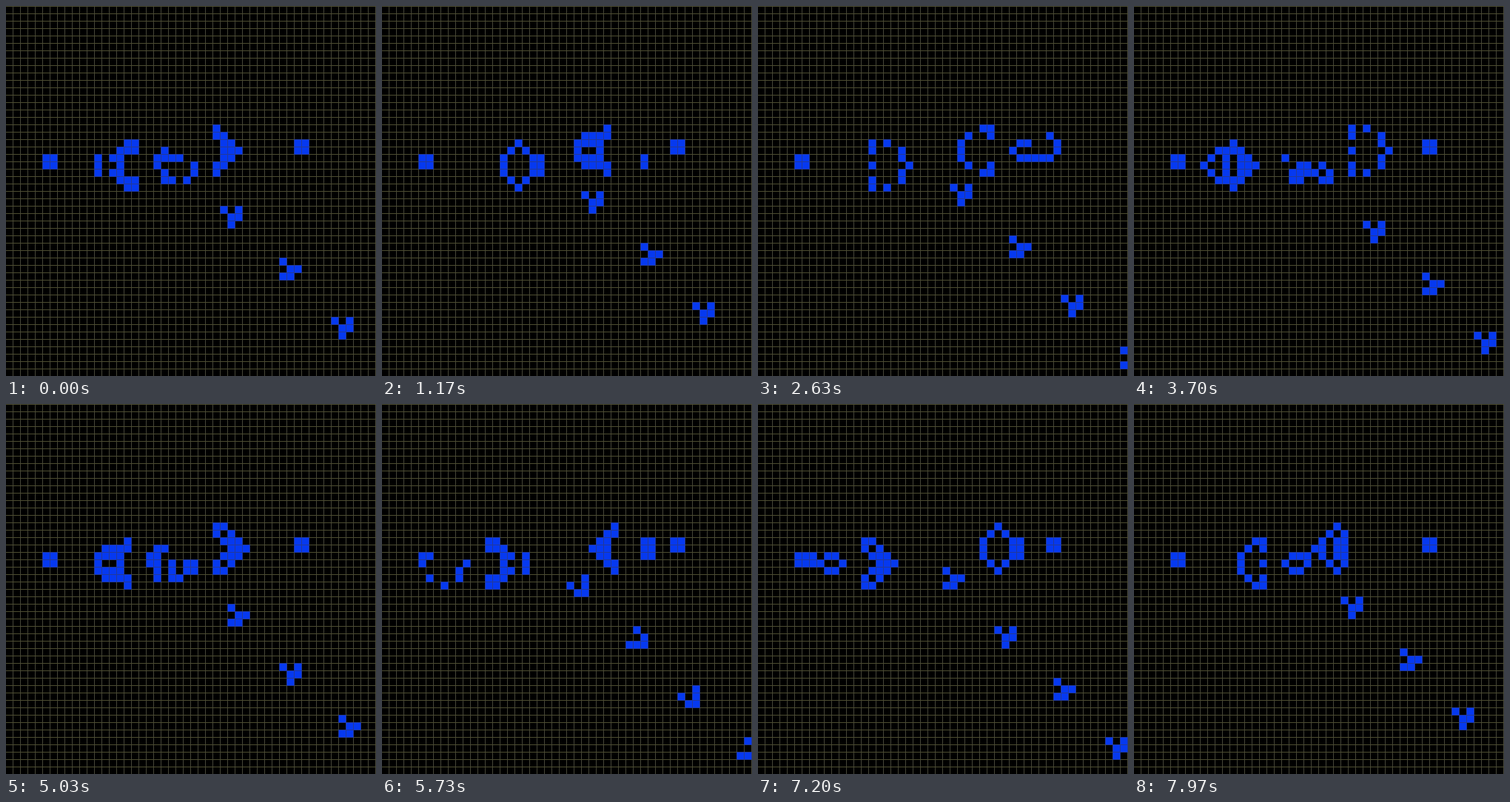
An HTML page for the animation above (8 s loop, 500 by 500 pixels).

```html
<!DOCTYPE html>
<html lang="en">
<head>
<meta charset="utf-8">
<title>Glider gun</title>
<style>
  html, body { margin: 0; width: 100%; height: 100%; overflow: hidden; background: #000; }
  svg { display: block; width: 100vw; height: 100vh; }
</style>
</head>
<body>
<svg viewBox="0 0 500 500" shape-rendering="crispEdges">
  <rect width="500" height="500" fill="#000"/>
  <path id="columns" stroke="#464638"/>
  <path id="rows" stroke="#4c4c30"/>
  <path id="cells" fill="#0639f0" stroke="#22399a"/>
</svg>
<script>
const LOOP = 8000, STEP = 54.7, PHASE = 0.77;
const SIZE = 10, COUNT = 50, WARMUP = 156;

const GUN = [
  '........................O',
  '......................O.O',
  '............OO......OO............OO',
  '...........O...O....OO............OO',
  'OO........O.....O...OO',
  'OO........O...O.OO....O.O',
  '..........O.....O.......O',
  '...........O...O',
  '............OO'
];
const LEFT = 5, TOP = 16, WIDE = 1024;

// A cell is stored as y * WIDE + x.
function seed() {
  const live = new Set();
  GUN.forEach((row, y) => [...row].forEach((c, x) => {
    if (c === 'O') live.add((y + TOP) * WIDE + x + LEFT);
  }));
  return live;
}

function evolve(live) {
  const near = new Map();
  for (const cell of live)
    for (let dy = -1; dy <= 1; dy++)
      for (let dx = -1; dx <= 1; dx++) {
        if (!dx && !dy) continue;
        const k = cell + dy * WIDE + dx;
        near.set(k, (near.get(k) || 0) + 1);
      }
  const next = new Set();
  for (const [k, n] of near)
    if (n === 3 || (n === 2 && live.has(k))) next.add(k);
  return next;
}

// Cell edges run along the middle of the grid lines.
function outline(live) {
  let d = '';
  for (const k of live) {
    const x = k % WIDE, y = Math.floor(k / WIDE);
    if (x < COUNT && y < COUNT) d += `M${x * SIZE - 0.5} ${y * SIZE + 0.5}h10v10h-10z`;
  }
  return d;
}

let live = seed();
for (let i = 0; i < WARMUP; i++) live = evolve(live);

const poses = [];
for (let i = 0; i <= LOOP / STEP + 1; i++) {
  poses.push(outline(live));
  live = evolve(live);
}

const byId = id => document.getElementById(id);
let columns = '', rows = '';
for (let i = 0; i <= COUNT; i++) {
  columns += `M${i * SIZE - 0.5} 0V500`;
  rows += `M0 ${i * SIZE + 0.5}H500`;
}
byId('columns').setAttribute('d', columns);
byId('rows').setAttribute('d', rows);

const cells = byId('cells');
let shown = -1;
function draw(t) {
  const gen = Math.floor(t / STEP + PHASE);
  if (gen === shown) return;
  shown = gen;
  cells.setAttribute('d', poses[gen]);
}

const start = performance.now();
function tick() {
  draw((performance.now() - start) % LOOP);
  requestAnimationFrame(tick);
}
draw(0);
requestAnimationFrame(tick);
</script>
</body>
</html>
```
